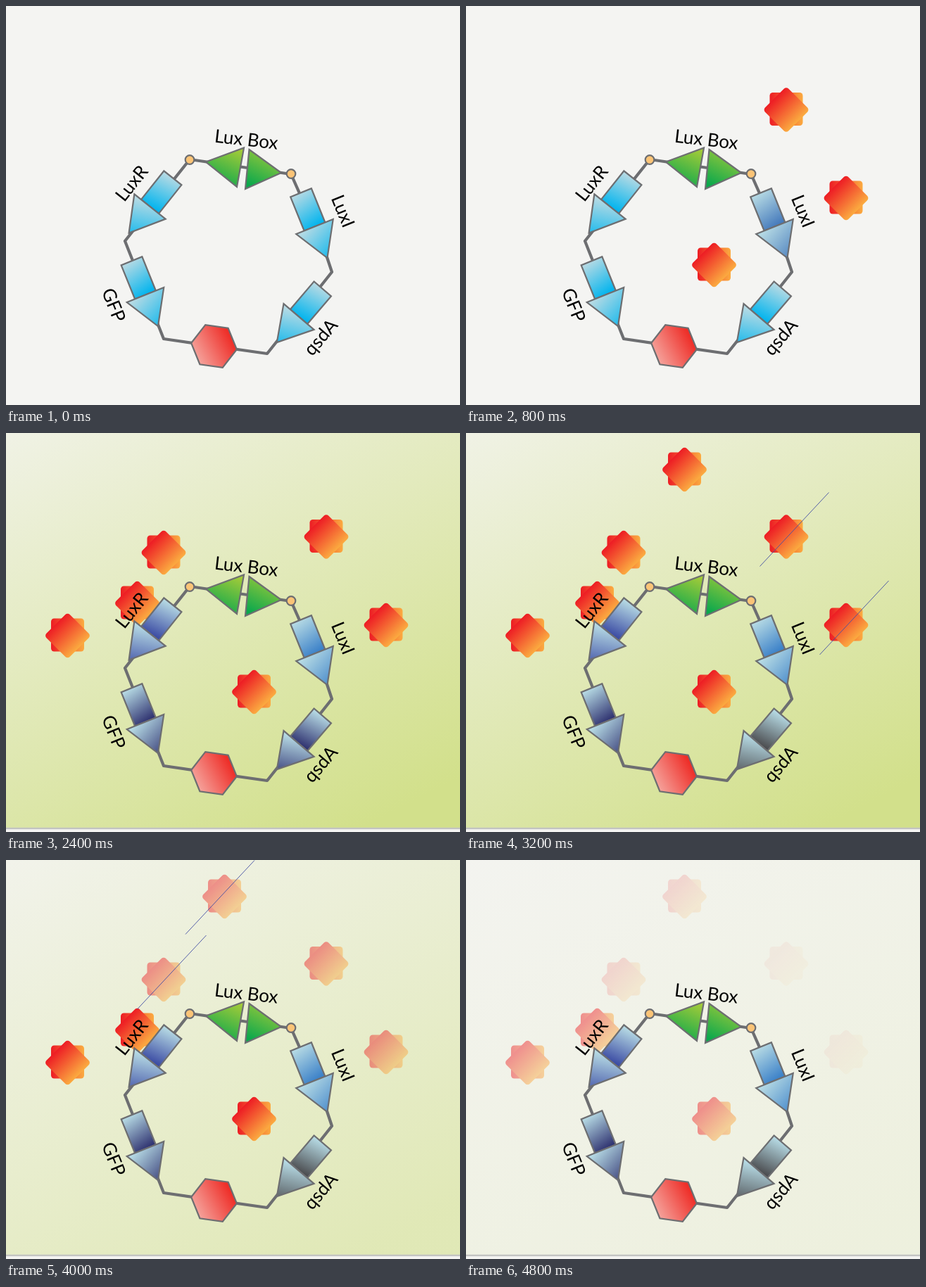
An HTML page that plays this animation: 645 px wide and 567 px high, repeating every 5.2 s.

```html
<!DOCTYPE html>
<html lang="en">
<head>
<meta charset="utf-8">
<title>Plasmid circuit</title>
<style>
html, body { margin: 0; width: 100%; height: 100%; overflow: hidden; background: #f4f4f2; }
svg { display: block; width: 645px; height: 567px; }
text { font-family: Lato, "Open Sans", sans-serif; font-size: 26px; }
.edge { stroke: #6d6e71; stroke-width: 2.2; }
</style>
</head>
<body>
<svg viewBox="0 0 645 567">
  <defs>
    <linearGradient id="sky" gradientUnits="userSpaceOnUse" x1="0" y1="0" x2="330" y2="650">
      <stop stop-color="#f0f2e5"/><stop offset="1" stop-color="#d2e08b"/>
    </linearGradient>
    <linearGradient id="fire">
      <stop stop-color="#ed1c24"/><stop offset="1" stop-color="#fbab40"/>
    </linearGradient>
    <linearGradient id="leaf" x1="0.8" y1="0" x2="0.35" y2="1">
      <stop stop-color="#a4cb39"/><stop offset="1" stop-color="#0ba84c"/>
    </linearGradient>
    <linearGradient id="rose" x1="0.1" y1="0.7" x2="0.9" y2="0.3">
      <stop stop-color="#f5a099"/><stop offset="1" stop-color="#ee2a24"/>
    </linearGradient>
    <g id="star" fill="url(#fire)">
      <rect x="-23.5" y="-24.5" width="47" height="47" rx="4.5"/>
      <rect x="-23.5" y="-23.5" width="47" height="47" rx="4.5" transform="rotate(45)"/>
    </g>
  </defs>
  <g id="backdrop">
    <rect width="645" height="561" fill="url(#sky)" id="glow"/>
    <rect y="560.7" width="645" height="2.4" fill="#c3c4c2"/>
  </g>
  <g id="stars"></g>
  <path fill="none" stroke="#6d6e71" stroke-width="4.2" stroke-linejoin="round"
    d="M261 218L405 239L452 345L463 378L371 494L224 473L169 334Z"/>
  <g class="edge">
    <path fill="url(#leaf)" d="M284 221.5L338 201.5L328 257Z"/>
    <path fill="url(#leaf)" d="M345.5 204L391 237L340 260Z"/>
    <polygon id="hexagon" fill="url(#rose)"/>
    <g id="genes"></g>
    <g fill="#fbc477">
      <circle cx="261" cy="218.5" r="6.3"/>
      <circle cx="405" cy="238.5" r="6.3"/>
    </g>
  </g>
  <g id="labels"></g>
  <g id="strikes" stroke="#4450a4" stroke-width="0.9"></g>
</svg>
<script>
const STEP = 400, LOOP = 5200;
const CYAN = "#00b4ee", NAVY = "#2f3270", PALE = "#b6dae4";
const WAVES = [8, 9, 11, 12]; // steps at which a new set of strike lines takes over
const $ = id => document.getElementById(id);

function add(parent, tag, attrs) {
  const el = document.createElementNS("http://www.w3.org/2000/svg", tag);
  for (const k in attrs) el.setAttribute(k, attrs[k]);
  parent.appendChild(el);
  return el;
}

function label(word, x, y, turn) {
  add($("labels"), "text", { transform: `translate(${x} ${y}) rotate(${turn})` }).textContent = word;
}

// Adds a pale-to-dark gradient and returns its dark stop.
function shade(id, x1, y1, x2, y2) {
  const grad = add($("genes"), "linearGradient",
    { id, gradientUnits: "userSpaceOnUse", x1, y1, x2, y2 });
  add(grad, "stop", { "stop-color": PALE });
  return add(grad, "stop", { offset: 1 });
}

// A block with an arrow head pointing along `angle`; (x, y) is where they meet.
function gene(word, x, y, angle, labelX, labelY, tints) {
  const body = "body" + word, head = "head" + word;
  const darks = [shade(body, -52, 6, 0, -6), shade(head, 0, 18, 56, -10)];
  const g = add($("genes"), "g", { transform: `translate(${x} ${y}) rotate(${angle})` });
  add(g, "rect", { x: -52, y: -16, width: 52, height: 32, fill: `url(#${body})` });
  add(g, "path", { d: "M0 -28.3L48 0L0 28.3Z", fill: `url(#${head})` });
  label(word, labelX, labelY, angle > 90 ? angle - 180 : angle);
  return { darks, tints };
}

// A star that shows up at one step and is struck out by a wave.
function star(x, y, show, wave, slide = [11.5, -10.5]) {
  const el = add($("stars"), "use", { href: "#star", transform: `translate(${x} ${y})` });
  const cx = x + slide[0], cy = y + slide[1];
  const line = add($("strikes"), "line",
    { x1: cx - 49, y1: cy + 52.5, x2: cx + 49, y2: cy - 52.5 });
  return { el, line, show, wave };
}

const genes = [
  gene("LuxI", 438.5, 313.5, 68, 461.5, 273, { 0: CYAN, 1: "#4479bb", 6: "#3a80c8" }),
  gene("qsdA", 416, 441.5, 130.5, 435, 498.5, { 0: CYAN, 6: NAVY, 8: "#4b4c4f" }),
  gene("GFP", 198, 410.5, 68, 135.5, 405.5, { 0: CYAN, 6: NAVY }),
  gene("LuxR", 204.5, 285, 128.5, 168, 279.5, { 0: CYAN, 3: "#474b9b", 6: "#3b4ba3" })
];
label("Lux Box", 295.5, 193.5, 6.5);

const stars = [
  star(540, 273, 1, 0),
  star(455, 147.5, 2, 0),
  star(352.5, 368, 2, 2),
  star(224, 170, 3, 1),
  star(87.5, 288, 3, 2),
  star(186.5, 242, 4, 2),
  star(310.5, 52, 7, 1, [-6.5, 1])
];

const corners = Array.from({ length: 6 }, (_, i) => {
  const a = (8 + 60 * i) * Math.PI / 180;
  return [295.5 + 32.7 * Math.cos(a), 483.5 + 32.7 * Math.sin(a)];
});
$("hexagon").setAttribute("points", corners.join(" "));

function tintAt(tints, s) {
  const last = Object.keys(tints).filter(k => k <= s).pop();
  return tints[last];
}

function starOpacity({ show, wave }, s) {
  if (s < show) return 0;
  const age = s - WAVES[wave] - 1;
  return age < 0 ? 1 : 0.46 * 0.3 ** Math.max(0, age - 1);
}

function draw(ms) {
  const s = Math.floor((ms % LOOP) / STEP);
  $("backdrop").style.display = s < 6 ? "none" : "";
  $("glow").setAttribute("opacity", 0.58 ** Math.max(0, s - 9));
  for (const g of genes)
    for (const stop of g.darks) stop.setAttribute("stop-color", tintAt(g.tints, s));
  for (const st of stars) {
    const struck = s >= WAVES[st.wave] && s < WAVES[st.wave + 1];
    st.el.setAttribute("opacity", starOpacity(st, s));
    st.line.style.display = struck ? "" : "none";
  }
}

const begin = performance.now();
function tick() {
  draw(performance.now() - begin);
  requestAnimationFrame(tick);
}
tick();
</script>
</body>
</html>
```
